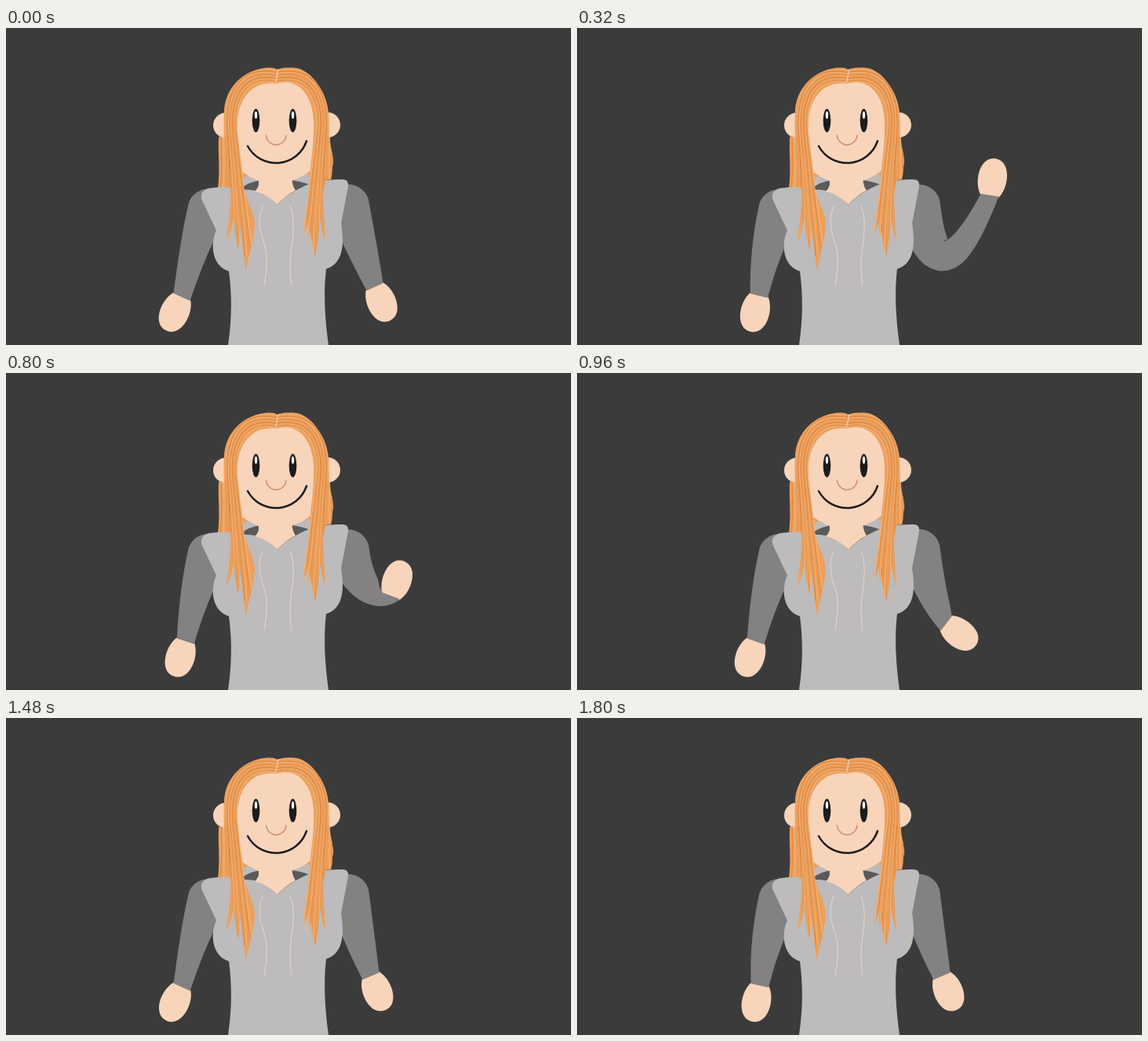
Write an HTML page that moves like this. It is 720x404 px and loops after 2000 ms.

```html
<!DOCTYPE html>
<html lang="en">
<head>
<meta charset="utf-8">
<title>Waving character</title>
<style>
  html, body { margin: 0; width: 100%; height: 100%; overflow: hidden; background: #3b3b3b; }
  svg { display: block; width: 100vw; height: 100vh; }
  .skin { fill: #f8d4ba; }
  .sleeve { fill: #848182; }
  .cloth { fill: #bdbbbb; }
  .hair { fill: #eca05b; }
  .ink { fill: #1b1b1b; }
  .line { fill: none; stroke-linecap: round; }
</style>
</head>
<body>
<svg viewBox="0 0 720 404">
  <defs>
    <path id="hand" class="skin" d="M-11 2C-23 -12 -21 -47 0 -47S23 -12 11 2Z"/>
    <path id="locks" d="M346 53C340 49 328 50 317 54C294 62 278 83 278 108
      C276 140 281 175 286 206C288 232 282 250 281 271Q289 256 290 236Q291 262 296 282Q299 265 298 244
      Q302 285 306 310C308 290 317 270 317 248C315 228 303 218 302 193C300 170 294 145 295 120
      C296 92 312 67 344 71C374 62 391 88 392 118C393 145 389 165 387 190
      C386 220 380 235 379 263Q384 252 385 243L385 270L388 258Q390 278 394 291Q399 268 400 236
      Q402 260 407 271C407 250 402 225 405 205C411 180 413 140 411 108
      C409 82 389 54 370 51C359 50 350 51 346 53Z"/>
    <path id="backHair" d="M278 122L271 140C270 160 273 180 270 204L288 203L306 200L312 187L300 130Z
      M408 130L413 138C412 150 418 162 417 173C415 180 416 188 414 193L388 196L378 188L388 150Z"/>
    <clipPath id="hairClip"><use href="#locks"/><use href="#backHair"/></clipPath>
  </defs>

  <rect width="720" height="404" fill="#3b3b3b"/>
  <g id="leftArm"><use href="#hand"/><path class="sleeve"/></g>
  <g id="rightArm"><use href="#hand"/><path class="sleeve"/></g>

  <use href="#backHair" class="hair"/>
  <path class="cloth" d="M300 193L310 187L324 193L322 212L298 212ZM363 192L386 186L392 196L392 210L366 212Z"/>
  <path d="M300 204Q310 196 324 194L321 212L300 212ZM363 194Q375 195 388 200L370 212L363 208Z" fill="#5b5a5b"/>
  <path class="cloth" d="M249 213Q250 206 260 204Q285 200 305 206C322 206 335 212 346 225
    C358 212 372 205 386 199Q405 192 429 193Q437 193 436 202L427 249C431 272 431 300 408 307
    C404 340 407 375 411 404L283 404C288 370 288 340 284 310C262 303 260 275 268 258L251 222Q248 217 249 213Z"/>
  <path class="skin" d="M322 185L322 200Q320 206 317 208Q333 212 346 225Q356 214 369 207Q365 203 363 185Z"/>
  <g class="skin">
    <circle cx="280" cy="124" r="16"/>
    <circle cx="410" cy="123.500" r="16"/>
    <path d="M290 120C292 85 310 65 344 65S394 85 396 120C396 150 392 170 388 182Q378 190 363 195L322 195Q308 189 299 182C294 160 290 145 290 120Z"/>
  </g>

  <g class="ink">
    <ellipse cx="318.500" cy="118" rx="4.800" ry="15"/>
    <ellipse cx="365.500" cy="118" rx="4.800" ry="15"/>
  </g>
  <g fill="#fff">
    <ellipse cx="318.500" cy="111" rx="1.700" ry="4.800"/>
    <ellipse cx="365.500" cy="111" rx="1.700" ry="4.800"/>
  </g>
  <path class="line" d="M331.500 137A12.800 13 0 0 0 357 137" stroke="#d0936f" stroke-width="1.600"/>
  <path class="line" d="M308 150.500A41 41 0 0 0 383 144" stroke="#1b1b1b" stroke-width="2.500"/>
  <path class="line" d="M327 227C316 255 331 270 332 290C333 308 330 320 329 328
    M362 227C371 250 363 275 362 298C362 315 363 322 364 328" stroke="#e5d8d4" stroke-width="1"/>

  <use href="#locks" class="hair"/>
  <g class="line" clip-path="url(#hairClip)">
    <g id="strands"></g>
    <use href="#strands" transform="translate(690 0) scale(-1 1)"/>
  </g>
  <path class="line" d="M347 53L343.500 69" stroke="#f6cfae" stroke-width="1.200"/>
</svg>

<script>
const LOOP = 2000, STEP = 40;
const lerp = (a, b, k) => a + (b - a) * k;
const mix = (a, b, k) => a.map((v, i) => lerp(v, b[i], k));
const easeIn = k => k ** 1.6;
const easeOut = k => 1 - (1 - k) ** 1.8;
const easeBoth = k => k * k * (3 - 2 * k);

// Strands fan out from the parting and fall between the outer and inner hair edge.
const tones = ['#df8742', '#f2b47a', '#e59550'];
let strands = '';
for (let i = 1; i < 14; i++) {
  const u = i / 14, wave = 2 * Math.sin(i * 2.4);
  const x = (outer, inner) => lerp(outer, inner, u).toFixed(1);
  strands += `<path stroke="${tones[i % 3]}" stroke-width="${1 + 0.3 * Math.sin(i * 5)}"
    d="M${x(346, 344)} ${x(53, 71)}C${x(283, 300)} ${x(42, 62)} ${x(277, 292)} ${x(95, 105)} ${x(279, 296)} 135
    S${x(287 + wave, 305 + wave)} 210 ${x(279, 318)} 290"/>`;
}
for (let i = 0; i < 4; i++)
  strands += `<path stroke="${tones[i % 3]}" d="M${274 + i * 3} 138Q${276 + i * 3} 170 ${273 + i * 4} 206"/>`;
document.getElementById('strands').innerHTML = strands;

// A pose is [wrist x, wrist y, elbow x, elbow y, hand tilt in degrees].
const left = {
  id: 'leftArm', shoulder: [258, 232],
  out: [224, 343, 242, 275, 205],
  rest: [233, 341, 242, 286, 192]
};
const right = {
  id: 'rightArm', shoulder: [436, 226],
  hang: [470, 330, 454, 282, 156],
  bent: [491, 284, 458, 271, 20],
  raised: [526, 213, 470, 290, 9],
  wave: [541, 219, 468, 280, 13],
  rest: [465, 329, 451, 282, 157]
};

// The sleeve is a tapering tube around a curve from shoulder through elbow to wrist.
function drawArm({ id, shoulder: [sx, sy] }, [wx, wy, ex, ey, tilt]) {
  const cx = 2 * ex - (sx + wx) / 2, cy = 2 * ey - (sy + wy) / 2;
  const cuffTurn = tilt * Math.PI / 180 - Math.atan2(wx - cx, cy - wy);
  const twist = Math.atan2(Math.sin(cuffTurn), Math.cos(cuffTurn));
  const sides = [[], []];
  for (let i = 0; i <= 20; i++) {
    const t = i / 20, radius = lerp(27, 11.5, t);
    const x = lerp(lerp(sx, cx, t), lerp(cx, wx, t), t);
    const y = lerp(lerp(sy, cy, t), lerp(cy, wy, t), t);
    const angle = Math.atan2(lerp(cx - sx, wx - cx, t), -lerp(cy - sy, wy - cy, t)) + twist * t ** 5;
    const dx = radius * Math.cos(angle), dy = radius * Math.sin(angle);
    sides[0].push(`${(x - dx).toFixed(2)} ${(y - dy).toFixed(2)}`);
    sides[1].unshift(`${(x + dx).toFixed(2)} ${(y + dy).toFixed(2)}`);
  }
  const [hand, sleeve] = document.getElementById(id).children;
  hand.setAttribute('transform', `translate(${wx} ${wy}) rotate(${tilt})`);
  sleeve.setAttribute('d', `M${sides.flat().join('L')}A27 27 0 0 1 ${sides[0][0]}Z`);
}

const rightKeys = [
  [0, right.hang], [160, right.bent, easeIn], [320, right.raised, easeOut],
  [560, right.wave, easeBoth], [600, right.wave, easeBoth], [800, right.bent, easeIn],
  [1080, right.rest, easeOut], [LOOP, right.rest, easeBoth]
];

function rightPose(t) {
  const i = rightKeys.findIndex(key => key[0] > t);
  const [t0, from] = rightKeys[i - 1], [t1, to, ease] = rightKeys[i];
  return mix(from, to, ease((t - t0) / (t1 - t0)));
}

// Quick swing inwards, slow drift out, second quick swing, then a hold.
function leftPose(t) {
  const swingTime = 160, again = 1500;
  if (t >= swingTime && t < again)
    return mix(left.rest, left.out, (t - swingTime) / (again - swingTime));
  const swing = Math.min(1, (t < again ? t : t - again) / swingTime);
  const pose = mix(left.out, left.rest, easeBoth(swing));
  pose[1] += 7 * Math.sin(Math.PI * swing);
  return pose;
}

function draw(time) {
  const t = Math.floor((time % LOOP) / STEP) * STEP;
  drawArm(left, leftPose(t));
  drawArm(right, rightPose(t));
}

const begin = performance.now();
function tick() {
  draw(performance.now() - begin);
  requestAnimationFrame(tick);
}
tick();
</script>
</body>
</html>
```
